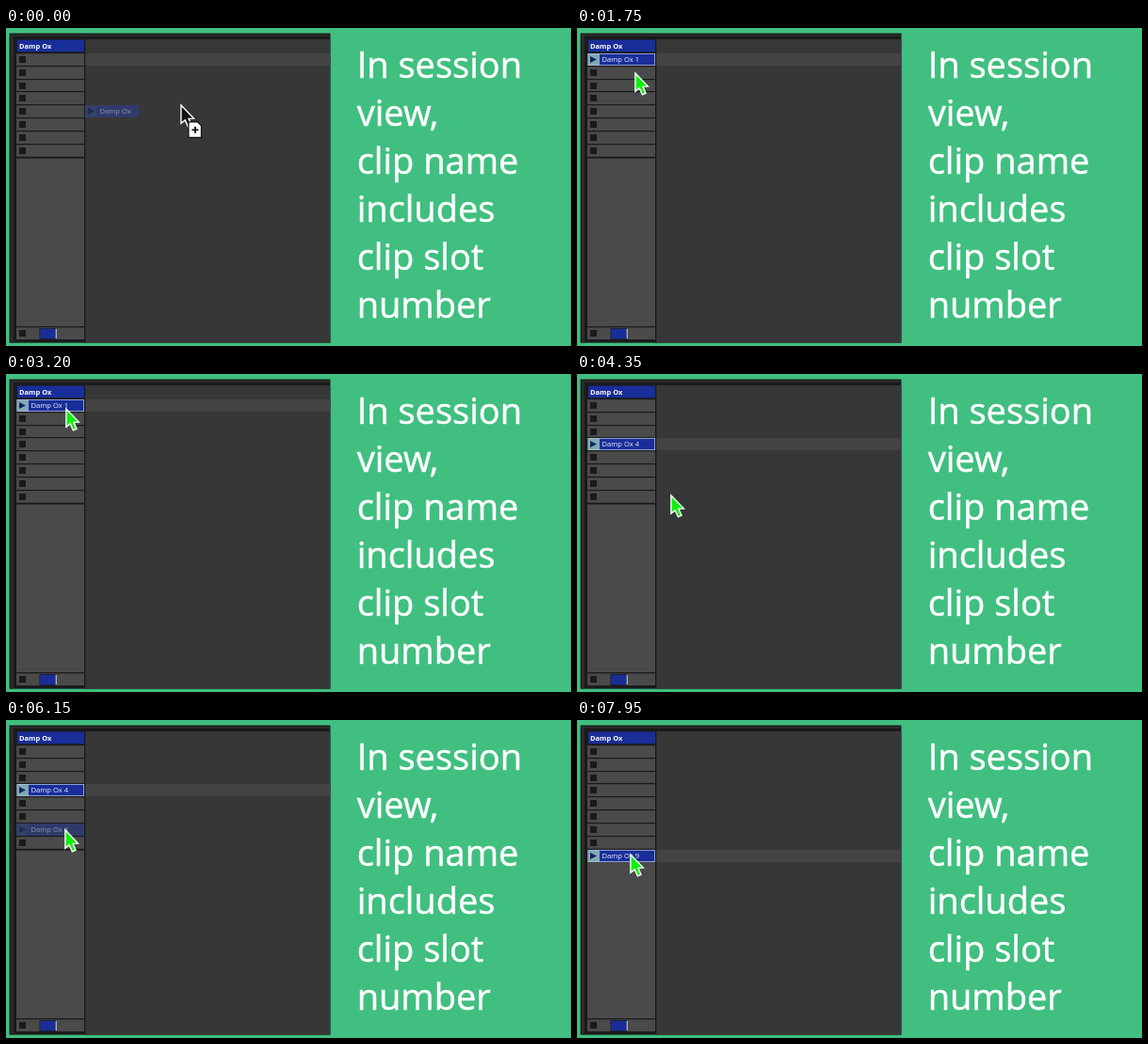
Write an HTML page with a canvas that moves like this. It is 600x338 px and loops after 8000 ms.

```html
<!DOCTYPE html>
<html lang="en">
<head>
<meta charset="utf-8">
<title>Clip names in session view</title>
<style>
  html, body { margin: 0; width: 100%; height: 100%; overflow: hidden; background: #40bf80; }
  canvas { display: block; width: 600px; height: 338px; }
</style>
</head>
<body>
<canvas id="stage" width="600" height="338"></canvas>
<script>
const ctx = document.getElementById('stage').getContext('2d');
const LOOP = 8000, STEP = 50;
const TRACK = 'Damp Ox';
const CAPTION = ['In session', 'view,', 'clip name', 'includes', 'clip slot', 'number'];
const FONT = '"Open Sans", "Noto Sans", sans-serif';
const ROW = 13.9, TOP = 26.7;
const BLUE = '#192e99', INK = '#1b1a1b', SLOT = '#4b4a4b';

// Every act: a clip lands, the pointer drifts away, returns and drags the clip on
const ACT = 2600, LEAD = 1350, GRAB = 2050;
const ACTS = [
  { slot: -1, rest: [185, 81], hover: [185, 81] },
  { slot: 0, rest: [61, 47], hover: [63, 36] },
  { slot: 3, rest: [99, 128], hover: [62, 74] },
  { slot: 8, rest: [79, 227], hover: [56, 142] }
];

const rowTop = row => Math.round(TOP + row * ROW);
const rowAt = y => Math.round((y - 31) / ROW);
const dropPoint = act => [62, rowTop(act.slot) + 8];

function ease(p, from, to) {
  const u = Math.min(1, Math.max(0, (p - from) / (to - from)));
  return u * u * (3 - 2 * u);
}

const mix = (a, b, u) => a.map((v, i) => v + (b[i] - v) * u);

function pointerAt(act, next, p) {
  if (p < 700) return mix(dropPoint(act), act.rest, ease(p, 0, 400));
  if (p < GRAB) return mix(act.rest, act.hover, ease(p, 700, 1500));
  return mix(act.hover, dropPoint(next), ease(p, GRAB, 2500));
}

function box(x, y, w, h, color) {
  ctx.fillStyle = color;
  ctx.fillRect(x, y, w, h);
}

function text(str, x, y, size, color, weight = 400) {
  ctx.font = `${weight} ${size}px ${FONT}`;
  ctx.fillStyle = color;
  ctx.fillText(str, x, y);
}

function polygon(points, fill) {
  ctx.beginPath();
  points.forEach(([x, y]) => ctx.lineTo(x, y));
  ctx.closePath();
  ctx.fillStyle = fill;
  ctx.fill();
}

function outline(color, width) {
  ctx.strokeStyle = color;
  ctx.lineWidth = width;
  ctx.stroke();
}

function playMark(x, y, color) {
  polygon([[x, y], [x + 7, y + 3.5], [x, y + 7]], color);
}

function drawPanel(row) {
  box(3.6, 5.6, 340.8, 329, INK);
  box(5, 7, 339.4, 2, '#2c2b2c');
  box(5, 9, 3, 325.6, '#2c2b2c');
  box(84, 12, 260.4, 322.6, '#383738');
  box(84, rowTop(row), 260.4, 13, '#454445');

  box(11, 12, 72, 319, SLOT);
  box(11, 12, 72, 14, INK);
  box(12, 12.5, 71, 12.7, BLUE);
  text(TRACK, 14, 21.5, 7.5, '#fff', 700);
  for (let i = 0; i < 8; i++) {
    const y = rowTop(i);
    box(11, y - 1, 72, 1.2, INK);
    box(14, y + 3, 7, 7, INK);
  }
  box(11, 136.8, 72, 1.8, INK);

  box(11, 317, 72, 1.3, INK);
  box(14, 321, 7, 7, INK);
  box(35.5, 319, 18.5, 12, INK);
  box(36.2, 319.7, 16.4, 10.6, BLUE);
  box(52.7, 319.7, 1.1, 10.6, '#d5d5dc');
  box(11, 331, 72, 1.5, INK);
  box(83, 12, 1.3, 322.6, INK);
}

function drawClip(row) {
  const y = rowTop(row);
  box(11.5, y, 71.5, 13, '#a9bce0');
  box(12, y + 0.8, 12, 11.4, '#7faab4');
  box(24, y + 0.8, 58.2, 11.4, BLUE);
  playMark(14, y + 3, '#14235f');
  text(`${TRACK} ${row + 1}`, 26.5, y + 9.2, 7.6, '#f0f2fa');
}

function drawGhost(x, y, label) {
  const [left, width] = x < 84 ? [11, 72] : [84, 57];
  const top = rowTop(rowAt(y));
  box(left, top, width, 13, '#303b6b');
  box(left, top, 12, 13, '#344168');
  playMark(left + 3, top + 3, '#222b4b');
  text(label, left + 15.5, top + 9.3, 7.6, '#8d95b2');
}

function drawPointer(x, y, copying) {
  ctx.save();
  ctx.translate(x + 0.4, y + 0.4);
  polygon([[0.5, 0.5], [0.5, 20], [4.8, 16.5], [8, 23.5], [11.6, 22], [8.6, 15], [14, 14.7]],
    copying ? '#111' : '#10f010');
  outline('#fff', 1.4);
  if (copying) {
    polygon([[8.5, 18.5], [18, 18.5], [22, 22.5], [22, 35], [8.5, 35]], '#fff');
    outline('#111', 1.2);
    box(12, 26, 7, 1.8, '#111');
    box(14.6, 23.4, 1.8, 7, '#111');
  }
  ctx.restore();
}

function drawCaption() {
  ctx.strokeStyle = '#fff';
  ctx.lineWidth = 0.5;
  CAPTION.forEach((line, i) => {
    const y = 53.3 + i * 51;
    text(line, 372.7, y, 38, '#fff');
    ctx.strokeText(line, 372.7, y);
  });
}

function draw(t) {
  const n = Math.floor((t + LEAD) / ACT);
  const p = (t + LEAD) % ACT;
  const act = ACTS[n], placed = act.slot >= 0;
  const [x, y] = pointerAt(act, ACTS[n + 1], p);

  box(0, 0, 600, 338, '#40bf80');
  drawPanel(Math.max(0, act.slot));
  if (placed) drawClip(act.slot);
  const dragging = !placed || p >= GRAB;
  if (dragging && rowAt(y) !== act.slot) {
    drawGhost(x, y, placed ? `${TRACK} ${act.slot + 1}` : TRACK);
  }
  drawCaption();
  drawPointer(x, y, !placed);
}

const start = performance.now();
function tick() {
  const t = (performance.now() - start) % LOOP;
  draw(t - t % STEP);
  requestAnimationFrame(tick);
}
tick();
</script>
</body>
</html>
```
